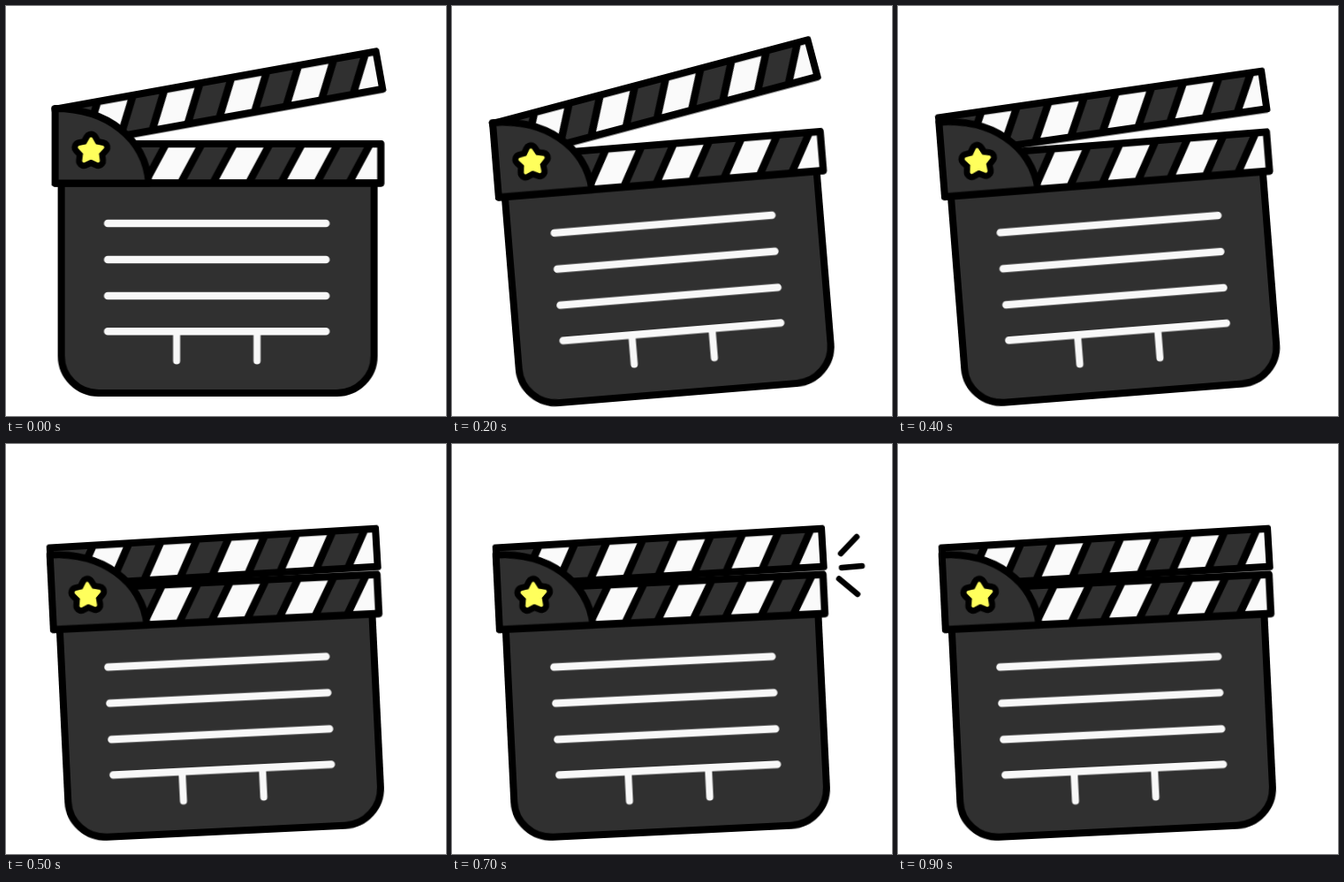
An HTML page that plays this animation: 498 px wide and 464 px high, repeating every 1000 ms.

```html
<!DOCTYPE html>
<html lang="en">
<head>
<meta charset="utf-8">
<title>Clapperboard</title>
<style>
  html, body { margin: 0; width: 100%; height: 100%; overflow: hidden; background: #fff; }
  svg { display: block; width: 498px; height: 464px; }
  .ink { fill: #303030; stroke: #000; stroke-width: 8; stroke-linejoin: round; }
  .tile { fill: #fafafa; stroke: #000; stroke-width: 8.5; stroke-linejoin: round; }
  .edge { fill: none; stroke: #000; stroke-width: 8; stroke-linejoin: round; }
  .chalk { fill: none; stroke: #f8f8f8; stroke-width: 8.5; stroke-linecap: round; }
  .spark { fill: none; stroke: #000; stroke-width: 6.5; stroke-linecap: round; }
  #board { transform-origin: 249px 242px; }
  #arm { transform-origin: 109px 116px; }
  #sparks { transform-origin: 405px 138px; }
</style>
</head>
<body>
<svg viewBox="0.4 0 498 464">
  <defs>
    <clipPath id="armClip"><rect x="-369" y="0" width="369" height="43.2"/></clipPath>
    <clipPath id="baseClip"><rect x="56" y="156" width="368.5" height="44.5"/></clipPath>
  </defs>
  <g id="board">
    <path class="ink" d="M63 200H417V396A42 42 0 0 1 375 438H105A42 42 0 0 1 63 396Z"/>
    <path class="chalk" d="M115.5 246H362.5M115.5 287H362.5M115.5 328H362.5M115.5 368.3H362.5"/>
    <path class="chalk" style="stroke-width:8" d="M193.5 370V401.5M284.5 370V401.5"/>

    <g id="arm">
      <g transform="translate(419 51.5) rotate(-10.2)">
        <rect class="ink" x="-369" width="369" height="43.2"/>
        <g id="armTiles" clip-path="url(#armClip)"></g>
        <rect class="edge" x="-369" width="369" height="43.2"/>
      </g>
    </g>

    <rect class="ink" x="56" y="156" width="368.5" height="44.5"/>
    <g id="baseTiles" clip-path="url(#baseClip)"></g>
    <rect class="edge" x="56" y="156" width="368.5" height="44.5"/>

    <path class="ink" d="M56 116V200.5H162C158 150 115 116 56 116Z"/>
    <g id="star" stroke-linejoin="round"></g>
  </g>
  <g id="sparks">
    <path class="spark" d="M440.4 124L458.4 105M441.4 140L464.4 138M438.4 152.5L459.4 170"/>
  </g>
</svg>
<script>
  const $ = id => document.getElementById(id);

  function add(parent, attrs) {
    const el = document.createElementNS('http://www.w3.org/2000/svg', 'polygon');
    for (const k in attrs) el.setAttribute(k, attrs[k]);
    $(parent).append(el);
  }

  // A row of slanted white tiles
  function tiles(parent, x, y, width, height, lean, count) {
    for (let i = 0; i < count; i++) {
      const l = x + i * 77, r = l + width, b = y + height;
      add(parent, { class: 'tile', points: `${l},${y} ${r},${y} ${r - lean},${b} ${l - lean},${b}` });
    }
  }
  tiles('armTiles', -320, 0, 40.7, 43.2, 22, 5);
  tiles('baseTiles', 181.5, 156, 40.5, 44.5, 24, 4);

  const star = Array.from({ length: 10 }, (_, i) => {
    const r = i % 2 ? 7.3 : 13.6, a = i * Math.PI / 5;
    return `${96.6 + r * Math.sin(a)},${164.2 - r * Math.cos(a)}`;
  }).join(' ');
  add('star', { points: star, stroke: '#000', 'stroke-width': 18 });
  add('star', { points: star, fill: '#ffff5c', stroke: '#ffff5c', 'stroke-width': 4 });

  // One value per 100 ms, each held until the next
  const tilt = [0, -2.1, -4.67, -6.3, -4.5, -2.78, -2.78, -2.78, -2.78, -2.78];
  const close = [0, 0, 0, 3.4, 6.5, 9.6, 9.6, 9.6, 9.6, 9.6];
  const burst = [0, 0, 0, 0, 0, 0, 1.33, 1, 1.33, 0];

  function play(id, values, fn) {
    const frames = [...values, values[values.length - 1]].map((v, i) => ({
      transform: `${fn}(${v}${fn === 'rotate' ? 'deg' : ''})`,
      offset: i / values.length,
      easing: 'step-end'
    }));
    $(id).animate(frames, { duration: 1000, iterations: Infinity });
  }
  play('board', tilt, 'rotate');
  play('arm', close, 'rotate');
  play('sparks', burst, 'scale');
</script>
</body>
</html>
```
